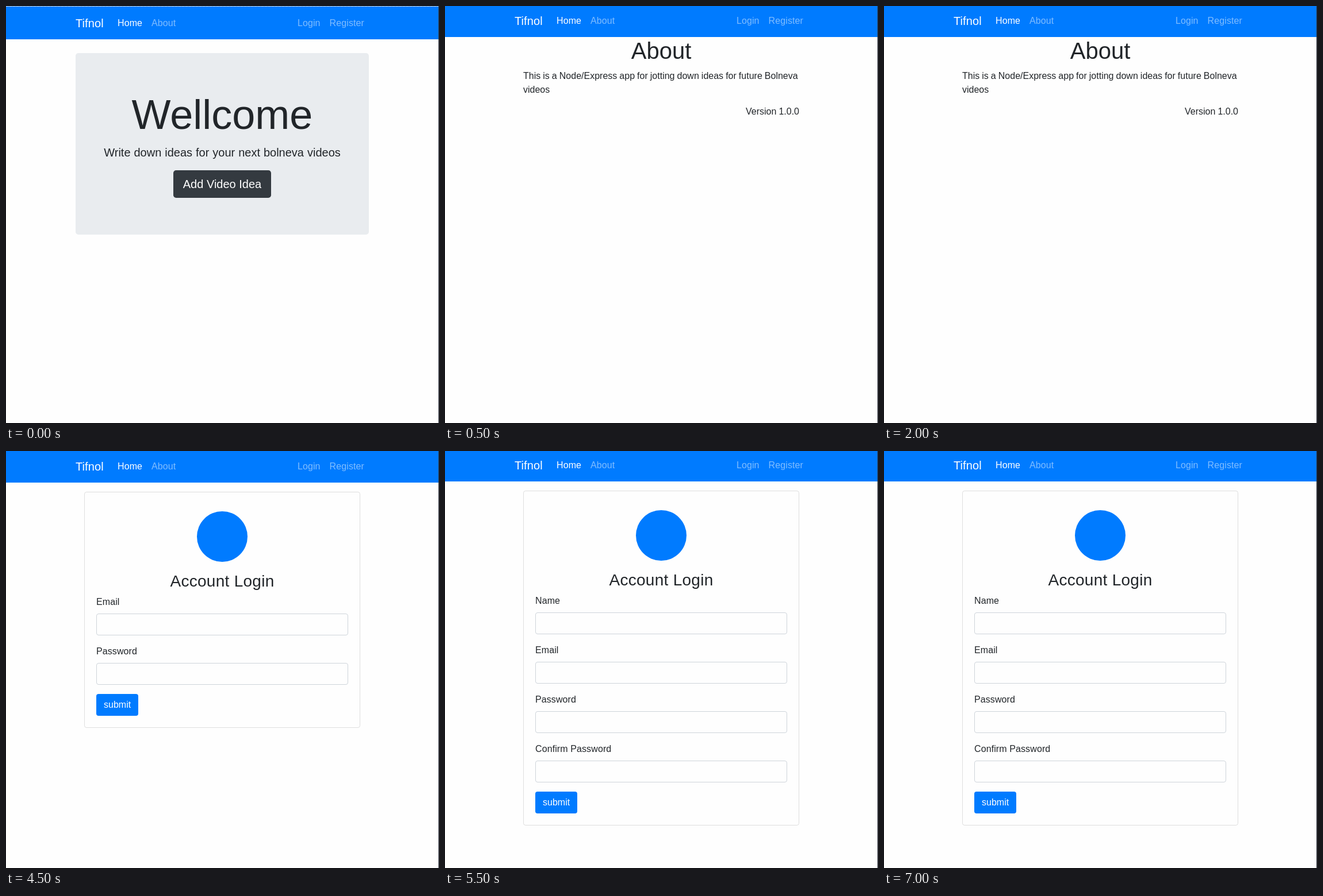
An HTML page for the animation above (8000 ms loop, 753 by 726 pixels).

```html
<!DOCTYPE html>
<html lang="en">
<head>
<meta charset="utf-8">
<title>Video idea app</title>
<style>
* { box-sizing: border-box; }
html, body { margin: 0; width: 100%; height: 100%; overflow: hidden; }
body { position: relative; background: #fefefe; color: #212529; font: 16px/1.5 "Liberation Sans", Arial, sans-serif; }
body::after { content: ""; position: absolute; left: 752px; top: 0; width: 1px; height: 100%; background: #2f343f; }
h1, h3, h6, p { margin: 0 0 8px; font-weight: 400; line-height: 1.2; white-space: nowrap; }
p { margin-bottom: 16px; line-height: 1.5; }
nav { position: absolute; left: 0; width: 752px; height: 56px; background: #007bff; color: #fff; line-height: 56px; letter-spacing: .1px; }
nav b { position: absolute; left: 121px; font-weight: 400; font-size: 20px; }
nav div { position: absolute; left: 186px; display: flex; }
nav .right { left: auto; right: 121px; }
nav span { padding: 0 8px; color: rgba(255, 255, 255, .5); }
nav .active { color: #fff; }
#edge { position: absolute; top: 0; width: 752px; height: 2px; background: repeating-linear-gradient(90deg, #d3dae1 0 4px, #b9cbdd 4px 6px) 0 0 / 100% 1px no-repeat #007bff; }
section { position: absolute; left: 136px; width: 480px; }
.hero { left: 121px; top: 82px; width: 510px; height: 316px; padding-top: 64px; border-radius: 4.8px; background: #e9ecef; text-align: center; font-size: 20px; }
.hero h1 { font-size: 72px; }
.hero p { word-spacing: .4px; }
.about { top: 54px; word-spacing: -.4px; }
.about h1 { font-size: 40px; text-align: center; }
.about h6 { font-size: 16px; text-align: right; }
.card { padding: 20px; border: 1px solid rgba(0, 0, 0, .125); border-radius: 4px; }
.card h3 { font-size: 28px; letter-spacing: .01em; text-align: center; }
.logo { width: 88px; height: 88px; margin: 13px auto 16.8px; border-radius: 50%; background: #007bff; }
.label { letter-spacing: .1px; }
.field { height: 38px; margin: 8px 0 16px; border: 1px solid #ced4da; border-radius: 4px; }
.button { display: inline-block; vertical-align: top; padding: 7px 13px; border-radius: 4px; background: #007bff; color: #fff; }
.hero .button { padding: 9px 17px; border-radius: 4.8px; background: #343a40; }
</style>
</head>
<body>
<div id="edge"></div>
<nav>
  <b>Tifnol</b>
  <div><span class="active">Home</span><span>About</span></div>
  <div class="right"><span>Login</span><span>Register</span></div>
</nav>
<main></main>
<script>
const nav = document.querySelector("nav");
const main = document.querySelector("main");
const edge = document.getElementById("edge");

const form = (top, labels) => `<section class="card" style="top:${top}px">
  <div class="logo"></div><h3>Account Login</h3>
  ${labels.map(label => `<div class="label">${label}</div><div class="field"></div>`).join("")}
  <span class="button">submit</span></section>`;

const pages = [
  { start: 0, navTop: 2, html: `<section class="hero"><h1>Wellcome</h1>
    <p>Write down ideas for your next bolneva videos</p>
    <span class="button">Add Video Idea</span></section>` },
  { start: 500, navTop: -2, html: `<section class="about"><h1>About</h1>
    <p>This is a Node/Express app for jotting down ideas for future Bolneva<br>videos</p>
    <h6>Version 1.0.0</h6></section>` },
  { start: 3000, navTop: -1, html: form(71, ["Email", "Password"]) },
  { start: 5500, navTop: -3, html: form(69, ["Name", "Email", "Password", "Confirm Password"]) }
];

let current;
function draw() {
  const time = performance.now() % 8000;
  const page = pages.findLast(p => time >= p.start);
  if (page !== current) {
    current = page;
    main.innerHTML = page.html;
    nav.style.top = page.navTop + "px";
    edge.hidden = page !== pages[0];
  }
  requestAnimationFrame(draw);
}
draw();
</script>
</body>
</html>
```
